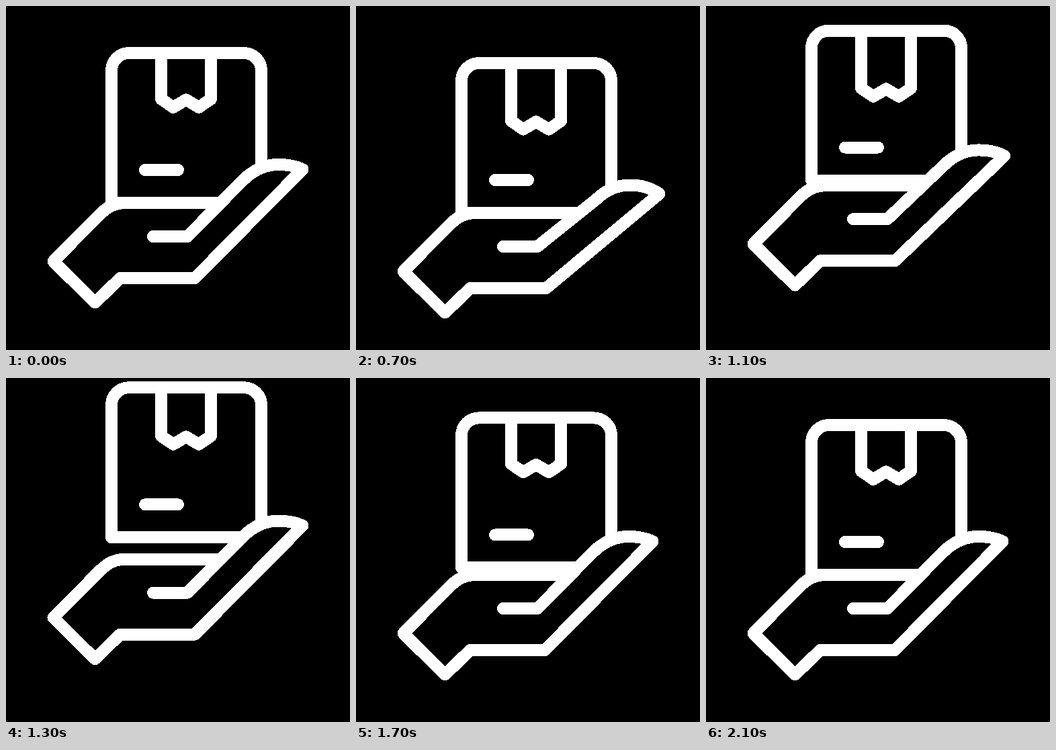
These frames come from a looping animation (512 px wide and 512 px high, 2.3 s). An HTML page:

```html
<!DOCTYPE html>
<html lang="en">
<head>
<meta charset="utf-8">
<title>Parcel on a hand</title>
<style>
  html, body { margin: 0; width: 100%; height: 100%; overflow: hidden; background: #000; }
  svg { display: block; width: 100%; height: 100%; }
  path {
    fill: none; stroke: #fff; stroke-width: 18; stroke-linecap: round; stroke-linejoin: round;
    shape-rendering: crispEdges;
  }
  #palm { fill: #000; }
</style>
</head>
<body>
<svg viewBox="0 0 512 512">
  <g id="box">
    <path d="M157 293V96A26 26 0 0 1 183 70H354A26 26 0 0 1 380 96V293Z"/>
    <path d="M207 244H256"/>
    <path id="ribbon"/>
  </g>
  <g id="hand">
    <path id="palm"/>
    <path id="thumb"/>
  </g>
</svg>
<script>
const LOOP = 2300, STEP = 100, LAST = 2100;
const el = id => document.getElementById(id);
const [box, ribbon, hand, palm, thumb] = ['box', 'ribbon', 'hand', 'palm', 'thumb'].map(el);

const smooth = s => (1 - Math.cos(Math.PI * s)) / 2;
const speedUp = s => s * s;
const slowDown = s => s * (2 - s);

// keys: [time, value, easing used to arrive there]
function track(keys, t) {
  const i = keys.findIndex(k => k[0] > t);
  if (i < 0) return keys[keys.length - 1][1];
  if (i === 0) return keys[0][1];
  const [t0, v0] = keys[i - 1], [t1, v1, ease = smooth] = keys[i];
  return v0 + (v1 - v0) * ease((t - t0) / (t1 - t0));
}

const LAUNCH = 1072;
const handKeys = [[0, 0], [700, 15], [1167, -28], [1667, 0]];
const flightKeys = [
  [LAUNCH, track(handKeys, LAUNCH)], [1250, -57, slowDown], [1583, -2, speedUp],
  [1820, -19.5], [2100, 0, speedUp]
];
const bendKeys = [[300, 0], [633, 1], [850, 1], [1235, 0]];
const ribbonKeys = [[367, 0], [700, 17.7], [1067, 17.7], [1400, 0]];

const shift = (node, y) => node.setAttribute('transform', `translate(0 ${y})`);

function drawRibbon(drop) {
  const side = 138.5 + drop, tip = 150.8 + drop, notch = 139.5 + drop;
  ribbon.setAttribute('d', `M231 70V${side}L249 ${tip}L268 ${notch}L287 ${tip}L305 ${side}V70`);
}

// bend: 0 = fingers raised, 1 = fingers pressed down
function drawHand(bend) {
  const p = (x, y, dx, dy) => `${x + dx * bend} ${y + dy * bend}`;
  const kneeX = 352 + 6 * bend, kneeY = 260 + 12.5 * bend;
  const meetX = 270 + (kneeX - 270) * 50 / (343 - kneeY);
  thumb.setAttribute('d', `M219 343H270L${kneeX} ${kneeY}`);
  palm.setAttribute('d', `M${meetX} 293L${kneeX} ${kneeY}
    C${p(369, 243, 5, 14)} ${p(386, 236, 4, 15.5)} ${p(405, 236, 3, 15.5)}
    C${p(419, 236, 6, 15.5)} ${p(431, 238, 9, 18.5)} ${p(441.5, 243, 10, 21.5)}
    L${p(281, 405, 2, 0)}H170L132.5 441.5L70.5 380L140 310C152 298 163 293 180 293Z`);
}

function frame(now) {
  const t = Math.min(Math.floor(now % LOOP / STEP) * STEP, LAST);
  const handY = track(handKeys, t);
  shift(hand, handY);
  shift(box, t < LAUNCH ? handY : track(flightKeys, t));
  drawRibbon(track(ribbonKeys, t));
  drawHand(track(bendKeys, t));
}

const start = performance.now();
function tick() {
  frame(performance.now() - start);
  requestAnimationFrame(tick);
}
tick();
</script>
</body>
</html>
```
